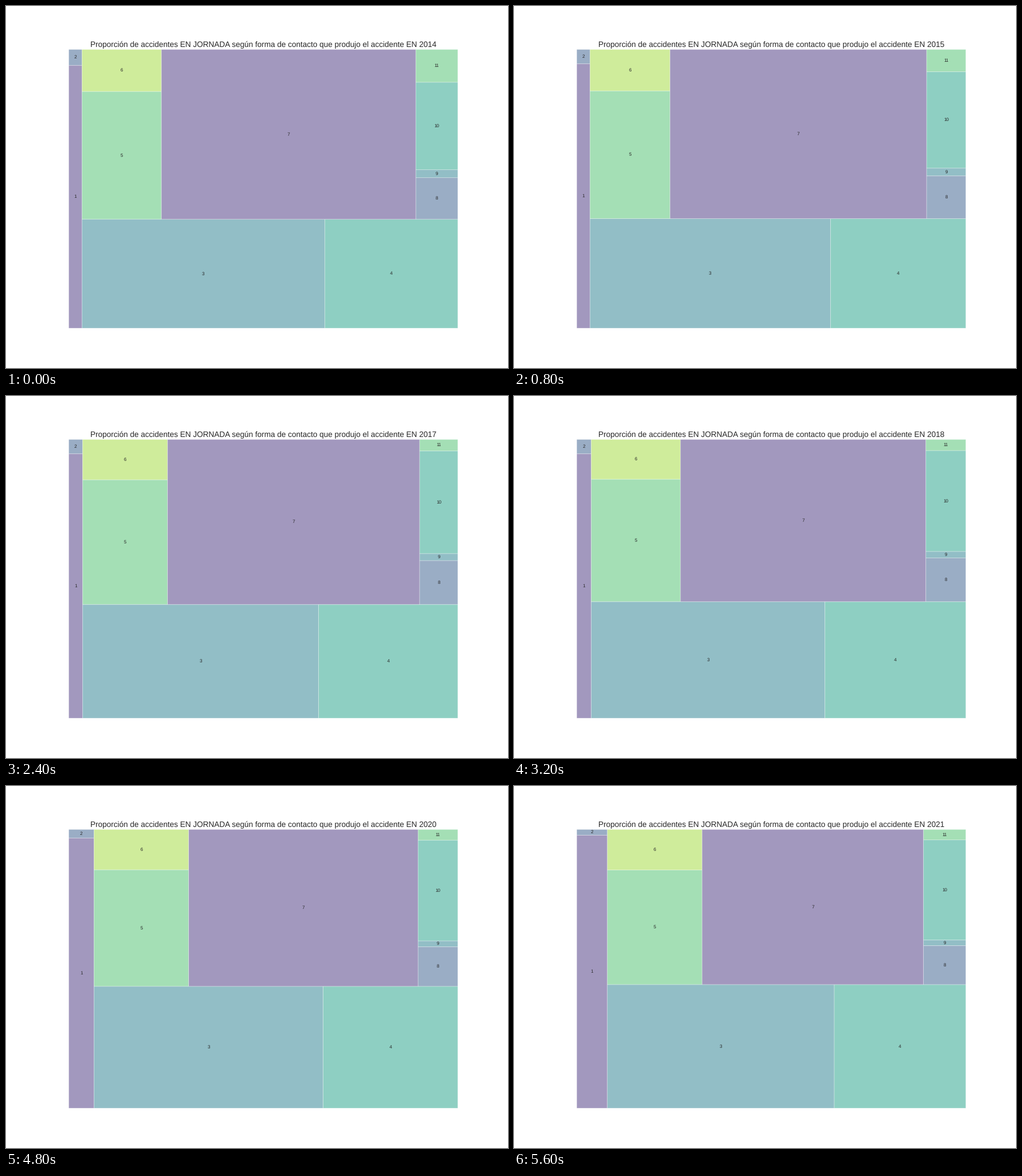
Animation, 881 px wide and 636 px high, one loop 6.4 s. Source, as a matplotlib script:

```python
import matplotlib.pyplot as plt
import numpy as np
from matplotlib.animation import FuncAnimation
from matplotlib.patches import Rectangle

W, H, DPI = 881, 636, 64
PT = 49 / DPI  # scale for font sizes and line widths
INK = "#262626"
PALETTE = ["#46327e", "#365c8d", "#277f8e", "#1fa187", "#4ac16d", "#a0da39"]
LEFT, RIGHT, TOP, BOTTOM = 0.125 * W, 0.9 * W, 0.12 * H, 0.89 * H
FIRST_YEAR, YEARS = 2014, 8
TITLE = ("Proporción de accidentes EN JORNADA según forma de contacto "
         "que produjo el accidente EN {}")


def smooth(u):
    return u * u * (3 - 2 * u)


def layout(t):
    """Boxes 1 to 11 as (left, top, right, bottom), t years after the first."""
    surge = 1 - 0.5 ** max(0, t - 5)  # sudden growth of box 1 from 2020 on

    # Left column, bottom row and the columns above it
    x1 = 133.3 + 1.1 * np.clip(t - 2, 0, 2) + 37.8 * surge
    y12 = 101.3 + 2.9 * max(0, 1 - t) - 20 * surge
    row = 374.7 - 27 * smooth(t / 8)
    x34 = x1 + 426.2 - 4 * t
    x57 = x1 + 139.5 + 1.07 * min(t, 5) ** 2
    y56 = 150.1 - min(t, 4) + 2 * surge

    # Right column, stacked from its bottom and its top
    x78 = RIGHT - np.interp(t, [0, 2, 5, 6, 7], [73.7, 63.8, 73.2, 69.7, 74.2])
    y89 = row - np.interp(t, [0, 2, 4, 5, 7], [73, 77.6, 76.6, 70.5, 68.5])
    y910 = y89 - 14 + 0.6 * t
    y1011 = 97.5 - 0.4 * t + 36.4 * max(0, 1 - t / 2)

    return [
        (LEFT, y12, x1, BOTTOM),
        (LEFT, TOP, x1, y12),
        (x1, row, x34, BOTTOM),
        (x34, row, RIGHT, BOTTOM),
        (x1, y56, x57, row),
        (x1, TOP, x57, y56),
        (x57, TOP, x78, row),
        (x78, y89, RIGHT, row),
        (x78, y910, RIGHT, y89),
        (x78, y1011, RIGHT, y910),
        (x78, TOP, RIGHT, y1011),
    ]


plt.rcParams["font.family"] = "Liberation Sans"
plt.rcParams["text.hinting"] = "none"
fig = plt.figure(figsize=(W / DPI, H / DPI), dpi=DPI, facecolor="white")
ax = fig.add_axes([0, 0, 1, 1])
ax.set_xlim(0, W)
ax.set_ylim(H, 0)
ax.axis("off")

title = ax.text((LEFT + RIGHT) / 2, TOP - 4.1, "", fontsize=20 * PT,
                color=INK, ha="center", va="baseline")
boxes, labels = [], []
for i in range(11):
    box = Rectangle((0, 0), 1, 1, facecolor=PALETTE[i % 6], edgecolor="white",
                    linewidth=PT, alpha=0.5, snap=False)
    boxes.append(ax.add_patch(box))
    labels.append(ax.text(0, 0, str(i + 1), fontsize=12 * PT, color=INK,
                          ha="center", va="center"))


def update(t):
    title.set_text(TITLE.format(FIRST_YEAR + t))
    for box, label, (x0, y0, x1, y1) in zip(boxes, labels, layout(t)):
        box.set_bounds(x0, y0, x1 - x0, y1 - y0)
        label.set_position(((x0 + x1) / 2, (y0 + y1) / 2))
    return [title, *boxes, *labels]


anim = FuncAnimation(fig, update, frames=YEARS, interval=800,
                     repeat=True, repeat_delay=0)
plt.show()
```
